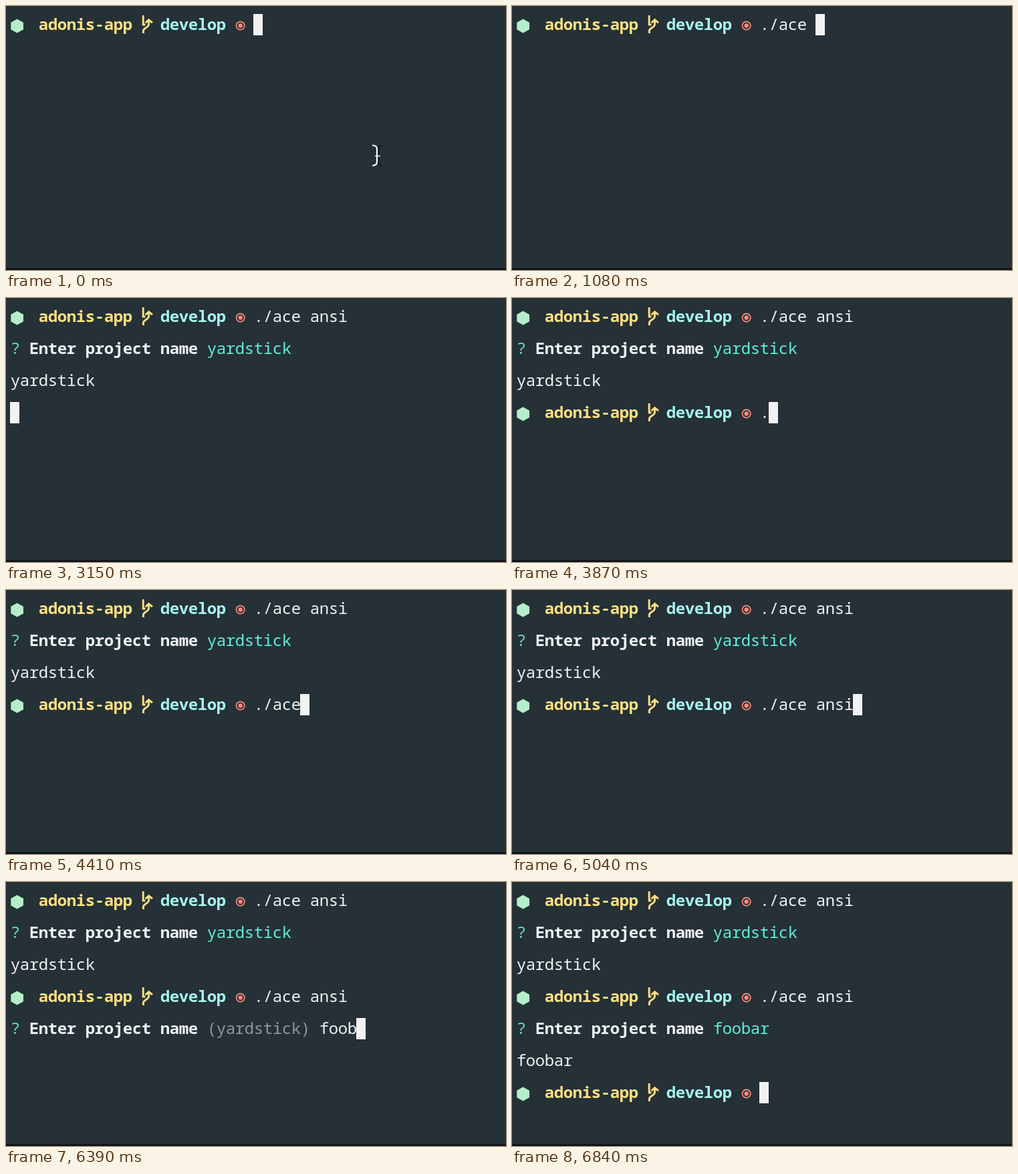
Write an HTML page that moves like this. It is 748 by 396 pixels and loops after 6.93 s.

```html
<!DOCTYPE html>
<html lang="en">
<head>
<meta charset="utf-8">
<title>Terminal prompt</title>
<style>
  html, body { margin: 0; width: 100%; height: 100%; overflow: hidden; background: #253137; }
  svg { display: block; width: 748px; height: 396px; }
  text {
    font-family: "Noto Sans Mono", "DejaVu Sans Mono", monospace;
    font-size: 24px;
    font-weight: 460;
    letter-spacing: -0.4px;
    white-space: pre;
    font-variant-ligatures: none;
  }
  .bold { font-weight: 620; }
</style>
</head>
<body>
<svg id="stage" viewBox="0 0 748 396" xmlns="http://www.w3.org/2000/svg">
  <rect width="748" height="396" fill="#253137"/>
  <rect y="393.5" width="748" height="2.5" fill="#0b0f15"/>
</svg>
<script>
const LOOP = 6930, CELL = 14, ROW = 48, LEFT = 6;
const WHITE = '#f0f1f1', YELLOW = '#ffe082', AQUA = '#a7f5ee', RED = '#ff8a7a',
      TEAL = '#64ecd8', GREEN = '#69dfa9', MINT = '#b5efc9', GREY = '#8f979b';

const stage = document.getElementById('stage');
const parts = [];   // { node, from, to }
const typing = [];  // { node, text, times }

function make(tag, attrs, parent = stage) {
  const node = document.createElementNS('http://www.w3.org/2000/svg', tag);
  for (const key in attrs) node.setAttribute(key, attrs[key]);
  parent.appendChild(node);
  return node;
}

function group(from, to = LOOP) {
  const node = make('g', {});
  parts.push({ node, from, to });
  return node;
}

function write(parent, row, col, text, fill, bold = false) {
  const node = make('text', {
    x: LEFT + 0.8 + col * CELL, y: 36 + row * ROW, fill, class: bold ? 'bold' : ''
  }, parent);
  node.textContent = text;
  return node;
}

function prompt(row, from) {
  const g = group(from);
  const icons = make('g', { transform: `translate(0 ${row * ROW})` }, g);
  make('path', { d: 'M16.5 19.5L26 24.8V35.2L16.5 40.5L7.3 35.2V24.8Z', fill: MINT }, icons);
  make('path', {
    d: 'M205.2 14V28H208.5M205.4 41V37.5Q205.4 35 208.5 33.2Q213.6 30.5 213.6 27V21' +
       'M208.6 25.2L213.6 20.6L219 25.2',
    fill: 'none', stroke: YELLOW, 'stroke-width': 2.9
  }, icons);
  make('circle', { cx: 350.7, cy: 29.5, r: 6.2, fill: 'none', stroke: RED, 'stroke-width': 1.7 }, icons);
  make('circle', { cx: 350.7, cy: 29.5, r: 3.2, fill: RED }, icons);
  write(g, row, 3, 'adonis-app', YELLOW, true);
  write(g, row, 16, 'develop', AQUA, true);
}

function question(row, from, answered, answer) {
  const g = group(from);
  write(g, row, 0, '?', GREEN);
  write(g, row, 2, 'Enter project name', WHITE, true);
  write(group(from, answered), row, 21, '(yardstick)', GREY);
  const done = group(answered);
  write(done, row, 21, answer, TEAL);
  write(done, row + 1, 0, answer, WHITE);
}

// Cursor steps: [time, row, column]
const cursorSteps = [
  [0, 0, 26], [1980, 1, 0], [2430, 1, 33], [3150, 3, 0], [3330, 3, 26],
  [5220, 4, 0], [5670, 4, 33], [6660, 6, 0], [6840, 6, 26]
];

function type(row, col, text, fill, times, to = LOOP) {
  typing.push({ node: write(group(times[0], to), row, col, text, fill), text, times });
  times.forEach((t, i) => cursorSteps.push([t, row, col + i + 1]));
}

prompt(0, 0);
type(0, 26, './ace ansi', WHITE, [450, 630, 720, 810, 900, 990, 1170, 1260, 1350, 1440]);
question(1, 2430, 3150, 'yardstick');
prompt(3, 3330);
type(3, 26, './ace ansi', WHITE, [3870, 4050, 4140, 4230, 4410, 4500, 4680, 4770, 4860, 4950]);
question(4, 5670, 6660, 'foobar');
type(4, 33, 'foobar', WHITE, [6120, 6210, 6300, 6390, 6480, 6570], 6660);
prompt(6, 6840);
cursorSteps.sort((a, b) => a[0] - b[0]);

const cursor = make('rect', { width: CELL, height: 32, fill: '#f2f2f2' });

// Mouse pointer, hidden once typing begins
const pointer = group(0, 450);
const line = (d, stroke, width) =>
  make('path', { d, stroke, 'stroke-width': width, fill: 'none' }, pointer);
line('M563 209Q557.4 209 557.2 214V234Q557.4 239 563 239.5', '#10181c', 2.2);
line('M548 209Q554.8 209 555 214V234Q554.8 239 548 239.5', '#fff', 2.2);
line('M552 225H560', '#fff', 1.4);

function draw(t) {
  for (const { node, from, to } of parts)
    node.style.display = t >= from && t < to ? '' : 'none';
  for (const { node, text, times } of typing)
    node.textContent = text.slice(0, times.filter(at => at <= t).length);
  const [, row, col] = cursorSteps.filter(step => step[0] <= t).pop();
  cursor.setAttribute('x', LEFT + col * CELL);
  cursor.setAttribute('y', 12 + row * ROW);
}

const start = performance.now();
function tick() {
  draw((performance.now() - start) % LOOP);
  requestAnimationFrame(tick);
}
tick();
</script>
</body>
</html>
```
